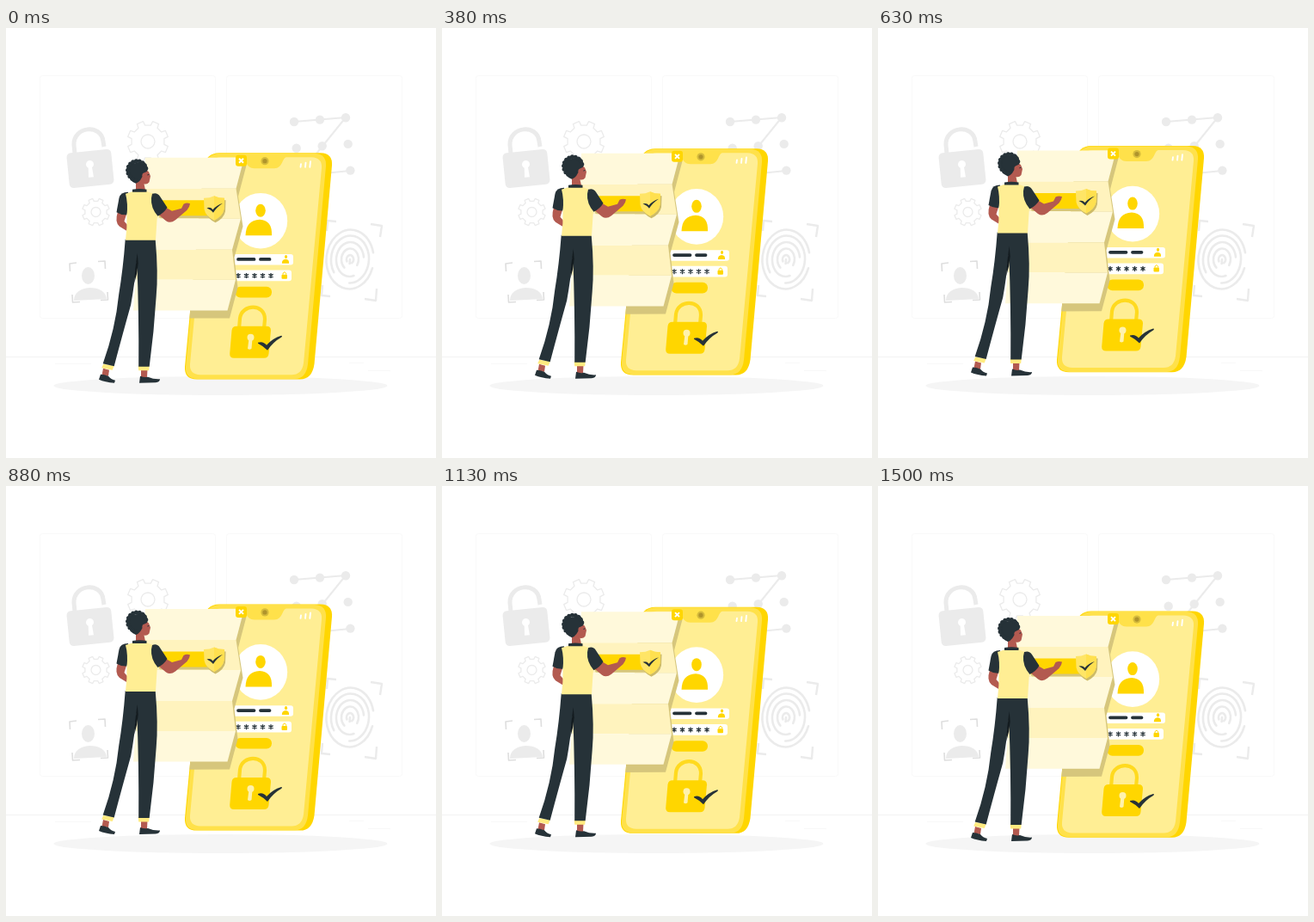
Recreate the animation shown at these times as an HTML page with a canvas. Size 500 by 500 pixels, loop 1.54 s.

```html
<!DOCTYPE html>
<html lang="en">
<head>
<meta charset="utf-8">
<title>Secure login</title>
<style>
html, body { margin: 0; width: 100%; height: 100%; overflow: hidden; background: #fff; }
canvas { display: block; width: 100vw; height: 100vh; }
</style>
</head>
<body>
<canvas id="stage"></canvas>
<script>
const canvas = document.getElementById('stage');
const ctx = canvas.getContext('2d');
const scale = Math.max(1, window.devicePixelRatio || 1);
canvas.width = canvas.height = 500 * scale;

const DARK = '#263238', SKIN = '#b35a50', GOLD = '#ffd600', CREAM = '#ffee94', GRAY = '#ebebeb';
const SHADE = '#d6c67c';
const LOOP = 1540, PEAK = 740, END = 1500;

function fill(d, color) {
  ctx.fillStyle = color;
  ctx.fill(new Path2D(d));
}

function line(d, color, width = 1, cap = 'butt') {
  ctx.strokeStyle = color;
  ctx.lineWidth = width;
  ctx.lineCap = cap;
  ctx.lineJoin = 'round';
  ctx.stroke(new Path2D(d));
}

function oval(x, y, rx, ry, color) {
  ctx.beginPath();
  ctx.ellipse(x, y, rx, ry, 0, 0, Math.PI * 2);
  ctx.fillStyle = color;
  ctx.fill();
}

function box(x, y, w, h, r, color) {
  ctx.beginPath();
  ctx.roundRect(x, y, w, h, r);
  ctx.fillStyle = color;
  ctx.fill();
}

function at(x, y, angle, draw) {
  ctx.save();
  ctx.translate(x, y);
  ctx.rotate(angle);
  draw();
  ctx.restore();
}

function gear(x, y, radius, hole) {
  const teeth = 8, step = Math.PI * 2 / teeth, root = radius * 0.8;
  at(x, y, step / 2, () => {
    ctx.beginPath();
    for (let i = 0; i < teeth; i++) {
      const a = i * step;
      for (const [offset, r] of [[-0.28, root], [-0.2, radius], [0.2, radius], [0.28, root]]) {
        ctx.lineTo(r * Math.cos(a + offset * step), r * Math.sin(a + offset * step));
      }
    }
    ctx.closePath();
    ctx.moveTo(hole, 0);
    ctx.arc(0, 0, hole, 0, Math.PI * 2);
    ctx.strokeStyle = GRAY;
    ctx.lineWidth = 1.3;
    ctx.lineJoin = 'round';
    ctx.stroke();
  });
}

function fingerprint() {
  const arcs = [[4, 2.6, 7.2], [10, 2.2, 6.8], [16, 1.2, 6.1], [22, 2.5, 7.8], [27.5, 0.25, 6.0]];
  at(400, 269, 0.07, () => {
    for (const [r, from, to] of arcs) {
      ctx.beginPath();
      ctx.ellipse(0, 0, r, r * 1.25, 0, from, to);
      ctx.strokeStyle = GRAY;
      ctx.lineWidth = 2.6;
      ctx.lineCap = 'round';
      ctx.stroke();
    }
    line('M0 0 V5', GRAY, 2.6, 'round');
  });
  line('M384 225 L374 224 L373 236 M424 228 L437 230 L435 243 M431 303 L430 317 L417 315 M377 312 L367 311 L368 299', GRAY, 2.4);
}

function background() {
  ctx.strokeStyle = '#f9f9f9';
  ctx.lineWidth = 1;
  for (const x of [39.5, 256.5]) {
    ctx.beginPath();
    ctx.roundRect(x, 55.5, 204, 282, 3);
    ctx.stroke();
  }
  line('M0 382.5 H500', '#f3f3f3');
  line('M57 390.5 H99 M399 389.5 H416 M421 398.5 H447', '#f8f8f8');

  line('M80 146 L79 136 C78 114 111 111 113 132 L114 138', GRAY, 5);
  at(98, 163.5, -0.1, () => {
    box(-26, -20.5, 52, 41, 5, GRAY);
    oval(0, -5, 4.5, 4.5, '#fff');
    fill('M-2 -3 H2 L3 10 H-3 Z', '#fff');
  });
  gear(165, 132, 24, 8);
  gear(104.5, 214, 16, 5.5);

  line('M82 273 L74 274 L74.5 283 M107 271.5 L115 271 L115.5 280 M118 307 L118.5 316 L110 316.5 M77 310 L77.5 319 L86 318.5', '#dedede', 1.6);
  oval(95.5, 288, 7.5, 10, GRAY);
  fill('M79 317 C79 308 86 303 97 302 C108 302 116 306 117 315 Z', GRAY);

  line('M335 109 L395 104 L340 172 L400 166', GRAY, 2);
  for (let row = 0; row < 3; row++) {
    for (let col = 0; col < 3; col++) {
      oval(335 + col * 30 + row * 2.7, 109 - col * 2.4 + row * 30.7, 5.2, 5.2, GRAY);
    }
  }
  fingerprint();
  oval(249.5, 416, 194, 11, '#f5f5f5');
}

function person(x, y, s) {
  at(x, y, 0, () => {
    ctx.scale(s, s);
    oval(2, -12, 5.8, 7.5, GOLD);
    fill('M-15.5 17 C-15 5 -10 -1 1 -1.5 C11 -1 15.5 5 15 17 Z', GOLD);
  });
}

function padlock() {
  line('M271 350 L272 338 C274 321 301 320 301 339 L300 350', '#ffda1f', 4.2);
  fill('M268 347 H303 Q308 347 308 352 L305.5 379 Q305 384 300 384 H265 Q260 384 260.2 379 L262.5 352 Q263 347 268 347 Z', GOLD);
  oval(284.5, 360, 4, 4, '#fff2ad');
  fill('M282.5 361 H286.5 L285.5 373 Q283 375 281 373 Z', '#fff2ad');
  fill('M293 366 Q299 364 303 369 Q310 361 320 358 Q322 358 320 360 Q311 365 304 375 Q299 370 293 367 Z', DARK);
}

const PHONE = 'M248 145.5 H366 Q380 146 379 160 L358.5 391 Q356 408.7 342 408.7 H222 Q207 408.7 208 394 L230 162 Q232 146 248 145.5 Z';
const PANEL_EDGE = [[277, 151], [267.5, 187], [273, 222], [263, 258], [267, 293], [257.5, 328.7]];

function phone() {
  fill(PHONE, GOLD);
  fill('M248 146 H359 Q373 147 372 161 L351 391 Q349 408 336 408.3 H223 Q208 408 209 394 L231 162 Q233 147 248 146 Z', '#ffe14a');
  fill('M250 150.5 H276 C279 151 278 163.5 289 163.5 H312 C322 163.5 321 151 326 150.5 H355 Q368 151 367 163 L346 390 Q344 403.5 332 403.5 H226 Q213 403 214 391 L235 164 Q237 151 250 150.5 Z', CREAM);
  oval(301, 155, 4.6, 4.6, '#d6bc3c');
  oval(301, 155, 2.6, 2.6, '#af942c');
  line('M343 158.5 L342.5 162 M348.5 157 L348 162 M354 155.5 L353.3 162', '#fff', 1.9, 'round');

  oval(296, 224.5, 31.2, 32.3, '#fff');
  person(294, 224.5, 1);
  box(262, 263.3, 72, 12.5, 3, '#fff');
  line('M270 269.2 H288.5 M296 269.2 H306.5', DARK, 3.8, 'round');
  person(325, 269.5, 0.27);
  box(262, 281.8, 70, 12.8, 3, '#fff');
  for (let i = 0; i < 5; i++) {
    at(270 + i * 9.5, 288.3, 0, () => line('M0 -3 V3 M-2.6 -1.6 L2.6 1.6 M2.6 -1.6 L-2.6 1.6', DARK, 1.3));
  }
  box(320.5, 287, 6.5, 5, 1, GOLD);
  line('M322 287 V285.5 Q324 282.5 325.7 285.5 V287', GOLD, 1);
  box(266.5, 301, 42.5, 12.7, 6, GOLD);
  padlock();
}

function panelShadow() {
  const edge = PANEL_EDGE.map(([x, y]) => `L${x + 2.5} ${y + 9}`).join(' ');
  ctx.save();
  ctx.clip(new Path2D(PHONE));
  fill(`M162 160 ${edge} L148 338 Z`, SHADE);
  ctx.restore();
}

function panel() {
  panelShadow();
  for (let i = 0; i < 5; i++) {
    const [x1, y1] = PANEL_EDGE[i], [x2, y2] = PANEL_EDGE[i + 1];
    const left = 162 - i * 2.8;
    fill(`M${left} ${y1} L${x1} ${y1} L${x2} ${y2} L${left - 2.8} ${y2} Z`, i % 2 ? '#fff3be' : '#fff9db');
  }

  box(267, 148, 13, 13, 3, GOLD);
  line('M271 152 L276 157 M276 152 L271 157', '#fff', 2);

  box(178, 203, 60, 18.5, 2, SHADE);
  box(176, 200.5, 62, 18, 2, GOLD);
  const shield = 'M230 198 Q237 198 242 195.5 Q247 198 254 198 L253.5 211 Q252 219 242 224 Q232 219 230.5 211 Z';
  at(1.5, 2.5, 0, () => fill(shield, '#cdbb68'));
  fill(shield, '#ffe566');
  fill('M242 195.5 Q247 198 254 198 L253.5 211 Q252 219 242 224 Z', '#ffe04f');
  fill('M233.5 209.5 Q238 208 240.5 211.5 Q245 206 252 204 Q245 208.5 241 215 Q238 211.5 233.5 209.5 Z', DARK);
}

function legs() {
  fill('M113 396 L120 398 L119 405 L111.5 404 Z M157 397 H164.5 L164 407 H157 Z', SKIN);
  fill('M110 403 Q114 403 119 405 Q122 409 127 410 L126 413 Q115 412 108 409Z', DARK);
  fill('M156 405 Q161 407 165 406 Q172 409 179 408.5 Q179 412 174 412.5 L155 413 Z', DARK);
  at(-0.8, 0, 0, () => {
    fill('M114 391 L126.5 393 L124.5 398 L112 395.5 Z M154.5 393 H167.5 L167 398.5 H155 Z', '#ffeb80');
    fill('M139.5 246 H174.5 Q178 285 175.5 312 Q173 353 167.5 394 H155 Q155.5 335 153 270 Q150 300 146 322 Q137 354 126.5 393.5 L113.5 390.5 Q128 350 132 310 Q137 280 139.5 246 Z', DARK);
    fill('M153.5 262 Q150.5 280 150 297 Q153.5 286 154.5 274 Z', '#131b1f');
  });
}

function head() {
  fill('M151 177 L157 167 Q163 164 166 167.5 L168 172.5 L166.5 179.5 Q164 182.5 160.5 181.5 L162 188.5 H151 Z', SKIN);
  fill('M147 188 Q155 186.5 163.5 188 V191 H147 Z', DARK);
  fill('M145 158 L161 156 Q166 162 164 167 L160 169 Q157 179 151 181 Q142 178 142 166 Z', DARK);
  for (let i = 0; i < 13; i++) {
    const a = 1.75 + i * 0.36;
    oval(152.3 + 10.7 * Math.cos(a), 166 + 11 * Math.sin(a), 2.5, 2.5, DARK);
  }
  oval(160.3, 171.5, 1.9, 2.6, SKIN);
  line('M164.3 171.2 L166.5 170.7', DARK, 0.9);
}

function man() {
  legs();
  fill('M130 214 Q126 226 132 231 L141 236.5 V229 L137.5 225 L140 217 Z', SKIN);
  fill('M142 191 Q133 191 131.5 198 L128.5 214.5 Q134 218 140.5 217.5 L143 205 Z', DARK);
  fill('M139 193 L148 190 H163 L171 193 L176 216 L174 247 H139 Q141 232 140.5 218 Q142 204 139 193 Z', CREAM);

  fill('M177 217 L186 209 L193 213 L204 210 L206.5 205 Q210 203 214 204.5 L213 208 L210.5 212 L197 223.5 Q191 228 186 224.5 Z', SKIN);
  fill('M170 193 Q176 191 179 196 L187.5 209 Q184 215 176.5 219 Q168 209 169 198 Z', DARK);
  head();
}

// Linear rise and fall, stepped at 24 pictures per second.
function lift(time) {
  const t = Math.floor((time + 4.9) * 24 / 1000) * 1000 / 24;
  return t < PEAK ? -0.3 - 9.6 * t / PEAK : 0.1 - 10 * Math.max(0, END - t) / (END - PEAK);
}

function render(now) {
  ctx.setTransform(scale, 0, 0, scale, 0, 0);
  ctx.fillStyle = '#fff';
  ctx.fillRect(0, 0, 500, 500);
  background();
  ctx.translate(0, lift(now % LOOP));
  phone();
  panel();
  man();
}

let start;
function tick(now) {
  start ??= now;
  render(now - start);
  requestAnimationFrame(tick);
}
render(0);
requestAnimationFrame(tick);
</script>
</body>
</html>
```
